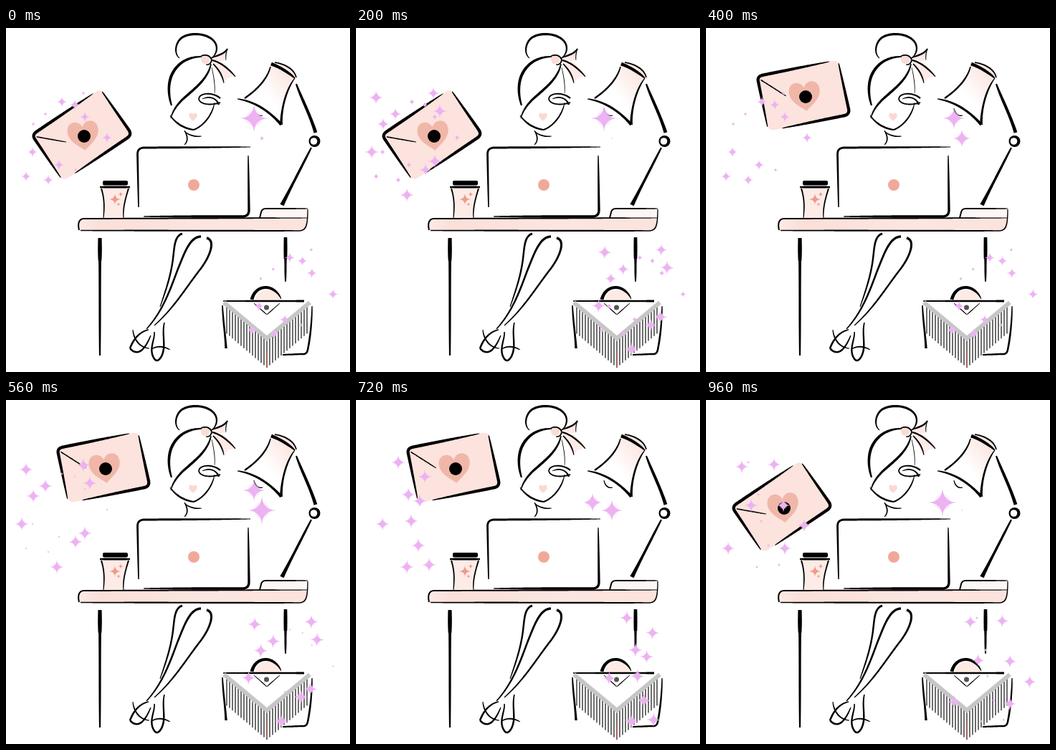
An HTML page that plays this animation: 480x480 px, repeating every 1 s.

```html
<!DOCTYPE html>
<html lang="en">
<head>
<meta charset="utf-8">
<title>Desk scene</title>
<style>
  html, body { margin: 0; width: 100%; height: 100%; overflow: hidden; background: #fff; }
  svg { display: block; width: 100vw; height: 100vh; }
</style>
</head>
<body>
<svg viewBox="0 0 480 480">
  <defs>
    <linearGradient id="wood">
      <stop offset="0" stop-color="#fdeae6"/><stop offset=".1" stop-color="#fbdfd9"/>
      <stop offset=".6" stop-color="#fce6e1"/><stop offset="1" stop-color="#fce2dc"/>
    </linearGradient>
    <linearGradient id="shade" x1="0" y1="1" x2="1" y2="0">
      <stop offset=".45" stop-color="#fff"/><stop offset=".8" stop-color="#fce8e3"/>
    </linearGradient>
    <radialGradient id="glow">
      <stop offset="0" stop-color="#ef9ff5"/><stop offset=".4" stop-color="#f5c3fa"/>
      <stop offset="1" stop-color="#fae0fc" stop-opacity="0"/>
    </radialGradient>
    <path id="star" d="M0-10Q.5-.5 10 0Q.5 .5 0 10Q-.5 .5-10 0Q-.5-.5 0-10Z"/>
    <path id="heart" d="M0 23C-8 15-23 7-23-8C-23-24-5-26 0-13C5-26 23-24 23-8C23 7 8 15 0 23Z"/>
    <g id="sparkle">
      <circle r="6.5" fill="url(#glow)"/>
      <use href="#star" fill="#ecb2f2"/>
    </g>
  </defs>

  <!-- hair, face, bow -->
  <path d="M285 43L300 37L309 29L306 46L290 47L305 49L320 67L309 70L304 77L289 51Z" fill="#fdeae6"/>
  <circle cx="278" cy="44" r="6" fill="#fadcd6"/>
  <path d="M242 42C234 36 236 20 246 13C258 6 280 7 290 18C296 25 295 35 288 41" data-w="1 3.2 1.2"/>
  <path d="M273 40C255 40 240 48 232 64C226 76 226 93 231 108" data-w="1.5 4 2"/>
  <path d="M286 50C282 72 260 87 246 100C238 108 232 117 230 126" data-w="1.5 3.4 1"/>
  <path d="M270 41C276 35 286 38 287 45C286 50 282 52 279 51" data-w="1 2 1"/>
  <path d="M286 42C294 38 303 38 309 29" data-w="1 2.4 2"/>
  <path d="M309 29Q306 37 307 45" data-w="1 1.2 .6"/>
  <path d="M288 45C300 48 312 58 320 68" data-w="2 2.4 1"/>
  <path d="M289 50C297 58 302 66 304 77" data-w="1.5 2 .8"/>
  <path d="M287 55C290 68 292 80 291 91" data-w=".6 .9 .6"/>
  <path d="M229 122C236 132 247 140 262 142" data-w="1 2.6 2"/>
  <path d="M262 142C275 137 288 122 291 104" data-w="2 2 .7"/>
  <path d="M299 98C288 89 270 90 269 99C270 106 284 109 299 104" data-w="2.4 1.8 2"/>
  <path d="M274 99C282 95 293 96 297 107" data-w=".8 1.8 2.6"/>
  <use href="#heart" transform="translate(261 124) scale(.25)" fill="#fbd9d3"/>
  <path d="M249 143C253 150 255 157 249 163" data-w="1 1.8 1"/>
  <path d="M249 144C255 150 264 152 273 151" data-w="1 1.8 .7"/>

  <!-- lamp -->
  <path d="M371 52L376 47L398 56L405 70C392 84 384 110 384 135C368 116 348 103 333 98C352 85 365 70 369 53Z" fill="url(#shade)"/>
  <path d="M355 265L357 256Q358 252 363 252H421V266Z" fill="#fef6f4"/>
  <path d="M370 50C380 54 392 60 403 70" data-w="5 4 1.5"/>
  <path d="M375 48C387 50 402 56 405 69" data-w="1.5 2 1.5"/>
  <path d="M369 54C365 70 352 85 333 98" data-w="1.5 2.4 2.4"/>
  <path d="M323 99C346 102 368 116 384 135" data-w="1.2 3 4"/>
  <path d="M403 70C392 84 384 110 384 135" data-w="1 2.6 4"/>
  <path d="M346 112C347 119 352 124 358 122" data-w="1 1.6 1"/>
  <path d="M405 78C412 98 424 120 432 146" data-w="2 4 5"/>
  <circle cx="430.5" cy="158" r="8"/>
  <circle cx="429.5" cy="158" r="4.8" fill="#fff"/>
  <path d="M426 167L385 247" data-w="2 3.4 6"/>
  <path d="M354 265L356 257Q357 252 363 252L421 252" data-w="2 2 1"/>

  <!-- desk -->
  <path d="M102 281C100 274 102 266 109 266H421V272Q421 283 411 283H104Z" fill="url(#wood)"/>
  <path d="M102 282C100 274 101 266 109 266L421 265" data-w="2 2 1"/>
  <path d="M104 282.5L408 283C418 283 421 278 421 253" data-w="1.5 2.2 1.2"/>
  <path d="M131 293V325" data-w="5 5.6 4.5"/>
  <path d="M131 320V457" data-w="4 3.2 2"/>
  <path d="M390 292V322" data-w="4.5 5 4.5"/>
  <path d="M390 318V354" data-w="4 3 1.5"/>

  <!-- laptop -->
  <rect x="184" y="166" width="155" height="97" rx="8" fill="#fff"/>
  <path d="M185 250L183.500 176Q183.500 167 193 167L341 166" data-w="1.5 3 .8"/>
  <path d="M338 178L339 254Q339 263 330 263L192 263" data-w="1.2 3.6 1.2"/>
  <circle cx="262" cy="219" r="8" fill="#f0a999"/>

  <!-- cup -->
  <path d="M133 223H172C166 240 163 252 164 265H136C137 252 138 240 133 223Z" fill="#fdebe7"/>
  <rect x="135" y="213" width="35" height="6.500" rx="2"/>
  <path d="M131 222H173" data-w="2.5 3 2.5"/>
  <path d="M133 224C138 240 137 252 136 265" data-w="2 1.800 1"/>
  <path d="M171 224C166 240 163 252 164 265" data-w="2 1.800 1"/>
  <g fill="#ee9c88">
    <use href="#star" transform="translate(152 239) scale(.8)"/>
    <use href="#star" transform="translate(160 232) scale(.4)"/>
    <use href="#star" transform="translate(157 246) scale(.3)"/>
  </g>

  <!-- legs and shoes -->
  <path d="M246 287C235 290 235 306 233 322C230 346 223 366 215 389" data-w="3 2.4 1"/>
  <path d="M272 291C256 291 248 317 240 336C230 362 220 394 196 420" data-w="3.5 2.6 1.5"/>
  <path d="M280 293C293 296 285 319 270 338C250 364 234 391 207 415" data-w="3.5 2.4 1.2"/>
  <path d="M199 421C186 424 178 434 173 447C178 453 184 454 190 449C196 443 199 436 202 429" data-w="1.5 2.6 1.2"/>
  <path d="M177 421C178 434 186 446 200 447" data-w="1 2 1"/>
  <path d="M207 424C208 434 200 446 205 458C209 467 213 465 217 458C224 444 217 428 221 411" data-w="1.5 2.6 1.5"/>
  <path d="M203 448C212 443 220 444 229 449" data-w="1 2 .8"/>

  <!-- bag -->
  <path d="M347 380C352 362 374 359 384 380Z" fill="#fdeae5"/>
  <path d="M343 379C348 357 374 356 384 378" data-w="5 4 .6"/>
  <path d="M303 381H416" data-w="1.5 2.4 3"/>
  <path d="M302 387C303 410 306 428 307 447" data-w="1.5 2.6 3.5"/>
  <path d="M427 388C427 410 424 435 421 449Q420 456 412 455L386 456" data-w="1.2 2.6 2"/>
  <path id="fringe" stroke="#222" stroke-width="1.3"/>
  <path d="M364 450V473" stroke="#b8604f" stroke-width="1.3"/>
  <path d="M304 383L364 433L424 383" fill="none" stroke="#c6c6c6" stroke-width="6"/>
  <path d="M346 384L364 400L382 384" data-w=".8 1.2 .8"/>
  <circle cx="363.5" cy="390" r="3.5" fill="#555"/>

  <!-- envelope -->
  <g id="mail">
    <g id="card">
      <rect x="-58" y="-39" width="116" height="78" rx="8" fill="#fce3dd"/>
      <path d="M-58 33L-58-32Q-58-39-50-39L45-39" data-w="1 4.4 .6"/>
      <path d="M57-34L58 31Q58 39 50 39L-38 39" data-w="1.2 4.4 .8"/>
      <path d="M-54-33L-24-4" data-w="1.5 1.6 1"/>
    </g>
    <use href="#heart" fill="#f0b7a9" transform="translate(2 1) rotate(-7) scale(.94 .91)"/>
    <circle cx="3" cy="2" r="9"/>
  </g>

  <g id="sky"></g>
</svg>

<script>
const $ = id => document.getElementById(id);
const { PI, abs, cos, sin, max, min } = Math;

// Turns each marked path into a brush stroke: start, middle and end width.
for (const p of document.querySelectorAll('[data-w]')) {
  const [a, b, c] = p.dataset.w.split(' ').map(Number);
  const len = p.getTotalLength(), n = Math.ceil(len / 2), left = [], right = [];
  for (let i = 0; i <= n; i++) {
    const u = i / n, s = u * len, end = u < .5 ? a : c;
    const from = p.getPointAtLength(max(0, s - .5));
    const to = p.getPointAtLength(min(len, s + .5));
    const { x, y } = p.getPointAtLength(s);
    const w = (end + (b - end) * abs(sin(PI * u)) ** .7) / 2;
    const dir = Math.atan2(to.y - from.y, to.x - from.x);
    const dx = -sin(dir) * w, dy = cos(dir) * w;
    left.push(`${x + dx} ${y + dy}`);
    right.unshift(`${x - dx} ${y - dy}`);
  }
  p.setAttribute('d', 'M' + [...left, ...right].join('L') + 'Z');
}

let threads = '';
for (let x = 308; x <= 420; x += 4) {
  const drop = abs(x - 364) * .85;
  threads += `M${x} ${434 - drop}V${474 - drop}`;
}
$('fringe').setAttribute('d', threads);

// Sparkles that twinkle together: time of the peak, then their places.
const early = [
  [320, '78,103 96,107 110,124 141,153 37,173 74,191 28,207 59,212'],
  [180, '28,97 117,116 22,173 110,186 71,233'],
  [140, '108,91 55,120 38,134 97,198']
];
const late = [
  [320, '50,93 95,90 63,147 108,147 137,175 31,207 110,207'],
  [110, '59,87 73,132 77,169 87,203 71,233 102,230'],
  [150, '96,107 89,141 37,173']
];

const sparkle = (place, r) => r < .6 ? '' :
  `<use href="#sparkle" transform="translate(${place}) scale(${r / 10})"/>`;

const twinkle = (groups, t) => groups.map(([peak, places]) => {
  const r = 10 * abs(cos(PI * (t - peak) / 400)) ** 1.5;
  return places.split(' ').map(place => sparkle(place, r)).join('');
}).join('');

function draw(t) {
  const second = t >= 600;
  const cluster = second ? twinkle(late, t - 600) : twinkle(early, t);
  $('sky').innerHTML = cluster +
    `<g transform="matrix(.985 .03 -.035 .985 322.8 216.6)">${cluster}</g>` +
    sparkle('357,154', 10 + 10 * cos(2 * PI * (t - 580) / 900)) +
    (second ? sparkle('330,143', 8 + 12 * sin(PI * (t - 600) / 720))
            : sparkle('346,126', 17 + 3 * cos(2 * PI * t / 240)));

  const up = t >= 240 && t < 760;
  $('mail').setAttribute('transform', up ? 'translate(136 94)' : 'translate(106 149)');
  $('card').setAttribute('transform', `rotate(${up ? -11.5 : -34})`);
}

const start = performance.now();
function tick() {
  draw(Math.floor((performance.now() - start) % 1000 / 40) * 40);
  requestAnimationFrame(tick);
}
tick();
</script>
</body>
</html>
```
